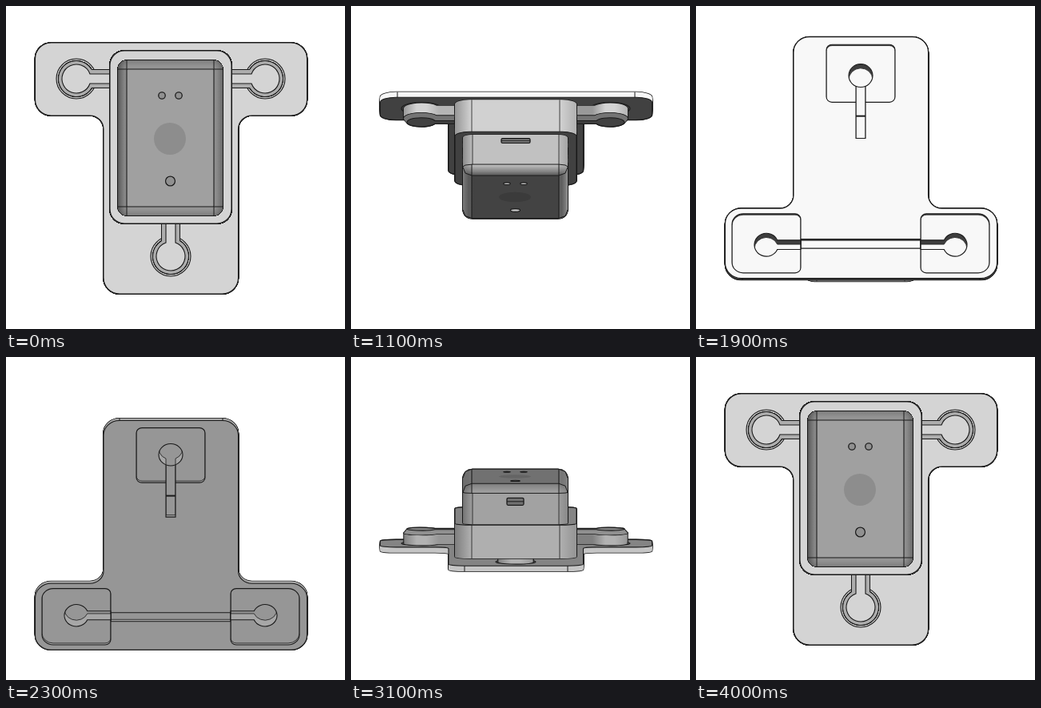
Animation, 424 px wide and 404 px high, one loop 4.1 s. Source, as an HTML page with a canvas:

```html
<!DOCTYPE html>
<html lang="en">
<head>
<meta charset="utf-8">
<title>Rotating enclosure</title>
<style>
  html, body { margin: 0; width: 100%; height: 100%; overflow: hidden; background: #fff; }
  canvas { display: block; }
</style>
</head>
<body>
<canvas id="stage" width="424" height="404"></canvas>
<script>
const ctx = document.getElementById('stage').getContext('2d');
const LOOP = 4100, CENTER_Y = 203, INK = '#1a1a1a';

// Depths along the model's z axis (towards the viewer at 0 degrees).
const BACK = -49, FRONT = -42, POCKET = -44, CAVITY = -25, RIM = 0, EDGE = 39, FACE = 50, FILLET = 11;
const CHAMFER = -29, MOUNT_TOP = -24;

// Turn angle by pose index; brightness by the tilt of a surface (negative faces up).
const TURN = [[0, 0], [7, 57], [11, 116.5], [15, 180], [30, 360]];
const PLATE = [[-90, 120], [-63, 173], [-47, 203], [-29, 240], [-15, 248], [0, 212], [26, 145], [41, 119], [61, 80], [90, 40]];
const BOX = [[-90, 105], [-47, 165], [-29, 207], [0, 160], [26, 133], [41, 113], [61, 80], [90, 45]];
const WALL = [[-90, 110], [-47, 165], [-29, 207], [0, 170], [26, 134], [43, 138], [90, 115]];

let theta, sin, cos, sideTilt;

function lerpTable(table, x) {
  let i = 1;
  while (i < table.length - 1 && x > table[i][0]) i++;
  const [x0, y0] = table[i - 1], [x1, y1] = table[i];
  const u = Math.max(0, Math.min(1, (x - x0) / (x1 - x0)));
  return y0 + (y1 - y0) * u;
}

const gray = v => { const c = Math.min(255, Math.round(v)); return `rgb(${c},${c},${c})`; };
const level = (table, tilt) => lerpTable(table, ((tilt + 540) % 360) - 180);
const shade = (table, tilt, k = 1) => gray(level(table, tilt) * k);

// Horizontal shading that falls off at the rounded left and right corners.
function cornered(x0, x1, r, value) {
  const g = ctx.createLinearGradient(x0, 0, x1, 0), edge = r / (x1 - x0);
  g.addColorStop(0, gray(value * .72));
  g.addColorStop(edge, gray(value));
  g.addColorStop(1 - edge, gray(value));
  g.addColorStop(1, gray(value * .85));
  return g;
}

function box(x, y, w, h, r) {
  const p = new Path2D();
  p.roundRect(x, y, w, h, r);
  return p;
}

function circle(x, y, r) {
  const p = new Path2D();
  p.arc(x, y, r, 0, 2 * Math.PI);
  return p;
}

function roundedPolygon(points) {
  const p = new Path2D(), n = points.length;
  p.moveTo((points[0][0] + points[n - 1][0]) / 2, (points[0][1] + points[n - 1][1]) / 2);
  points.forEach(([x, y, r], i) => {
    const next = points[(i + 1) % n];
    p.arcTo(x, y, next[0], next[1], r);
  });
  p.closePath();
  return p;
}

function keyhole({ x, y, angle, reach }, r, half) {
  const p = new Path2D(), a = Math.asin(half / r), placed = new Path2D();
  p.arc(0, 0, r, a, 2 * Math.PI - a);
  p.lineTo(reach, -half);
  p.lineTo(reach, half);
  p.closePath();
  placed.addPath(p, new DOMMatrix().translate(x, y).rotate(angle));
  return placed;
}

const range = (a, b) => Array.from({ length: b - a + 1 }, (_, i) => a + i);
const project = (y, z) => CENTER_Y + y * cos + z * sin;

function at(path, z) {
  const p = new Path2D();
  p.addPath(path, new DOMMatrix([1, 0, 0, cos, 0, CENTER_Y + z * sin]));
  return p;
}

function stroke(path, width = 1.1) {
  ctx.lineWidth = width;
  ctx.strokeStyle = INK;
  ctx.stroke(path);
}

function fill(path, style) {
  ctx.fillStyle = style;
  ctx.fill(path);
}

function polyline(points, width = 1) {
  const p = new Path2D();
  points.forEach(([x, y, z]) => p.lineTo(x, project(y, z)));
  stroke(p, width);
}

// Stacked slices: dark silhouette first, walls over it, then the near cap.
function solid(slices, wall, cap) {
  const order = cos >= 0 ? slices : [...slices].reverse();
  const shapes = order.map(([z, path]) => at(path, z));
  shapes.forEach(s => stroke(s, 1.5));
  shapes.forEach((s, i) => fill(s, wall(order[i][0])));
  const top = shapes[shapes.length - 1];
  fill(top, cap);
  stroke(top);
}

function recess(path, z, floorZ, wall, floor, floorPath = path) {
  const opening = at(path, z), bottom = at(floorPath, floorZ);
  ctx.save();
  ctx.clip(opening);
  fill(opening, wall);
  fill(bottom, floor);
  stroke(bottom, .8);
  ctx.restore();
  stroke(opening);
}

const plateShape = roundedPolygon([
  [36.5, -157, 20], [376.5, -157, 20], [376.5, -66, 20], [290.5, -66, 17],
  [290.5, 157, 20], [122, 157, 20], [122, -66, 17], [36.5, -66, 20]
]);
const plateSlices = range(BACK, FRONT).map(z => [z, plateShape]);

const mounts = [
  { x: 88, y: -112, angle: 0, reach: 43 },
  { x: 324, y: -112, angle: 180, reach: 43 },
  { x: 206, y: 110, angle: -90, reach: 42 }
];
// Each mount is a straight body below a chamfered top.
const mountParts = mounts.map(m => [
  range(FRONT, CHAMFER).map(z => [z, keyhole(m, 22, 11)]),
  range(CHAMFER, MOUNT_TOP).map(z => {
    const taper = 4 * (z - CHAMFER) / (MOUNT_TOP - CHAMFER);
    return [z, keyhole(m, 22 - taper, 11 - taper * 1.25)];
  })
]);

const collarShape = box(130, -147, 152, 216, 18);
const collarSlices = range(FRONT, RIM).map(z => [z, collarShape]);

const boxSlices = range(RIM, FACE).map(z => {
  const h = Math.max(0, z - EDGE), inset = FILLET - Math.sqrt(FILLET * FILLET - h * h);
  return [z, box(140 + inset, -135 + inset, 131 - 2 * inset, 194 - 2 * inset, Math.max(1, 12 - inset))];
});

function drawPlate() {
  const facing = cos >= 0 ? theta : theta + 180;
  solid(plateSlices, () => shade(PLATE, sideTilt), shade(PLATE, facing));
  const [xs, y] = sin > 0 ? [[58, 355], -157] : [[142, 271], 157];
  if (Math.abs(sin) > .2) xs.forEach(x => polyline([[x, y, BACK], [x, y, FRONT]]));
}

function drawBackDetails() {
  const wall = shade(PLATE, sideTilt), floor = shade(PLATE, theta + 180);
  recess(box(131, -118, 150, 12, 0), BACK, BACK + 6, wall, floor);
  [box(163, 72, 86, 75, 7), box(45, -150, 86, 77, [14, 7, 7, 14]), box(281, -150, 86, 77, [7, 14, 14, 7])]
    .forEach(p => recess(p, BACK, POCKET, wall, floor));
  recess(box(200, 25, 12, 74, 0), BACK, BACK + 6, wall, floor);
  polyline([[200, 54, BACK], [212, 54, BACK]], 2);
  const slotted = keyhole({ x: 206, y: 108, angle: -90, reach: 54 }, 15, 6);
  recess(circle(206, 108, 15), POCKET, CAVITY, wall, floor, slotted);
  mounts.slice(0, 2).forEach(m => recess(keyhole(m, 15, 6), POCKET, CAVITY, wall, floor));
}

function drawMounts() {
  const wall = level(WALL, sideTilt), face = level(PLATE, theta);
  mounts.forEach((m, i) => {
    if (cos > 0) {
      const base = at(circle(m.x, m.y, 25), FRONT);
      fill(base, gray(face * .92));
      stroke(base);
    }
    const [body, top] = mountParts[i];
    const bodyFill = cornered(m.x - 22, m.x + 22, 16, wall * 1.1);
    const chamferFill = gray(wall * .4 + face * .6);
    const steps = [
      () => solid(body, () => bodyFill, chamferFill),
      () => solid(top, () => chamferFill, gray(face))
    ];
    if (cos < 0) steps.reverse();
    steps.forEach(step => step());
  });
}

function drawCollar() {
  const wall = cornered(130, 282, 20, level(WALL, sideTilt) * 1.08);
  solid(collarSlices, () => wall, shade(PLATE, theta));
  const y = sin > 0 ? -147 : 69;
  if (Math.abs(sin) > .1) [151, 261].forEach(x => polyline([[x, y, FRONT], [x, y, RIM]], .8));
}

// A slot on the top or bottom wall of the box.
function drawSlot(x, y, z, w, h) {
  const p = new Path2D(), slot = box(x, z - h / 2, w, h, 1.5);
  p.addPath(slot, new DOMMatrix([1, 0, 0, sin, 0, CENTER_Y + y * cos]));
  fill(p, shade(WALL, sideTilt, .7));
  stroke(p, 1.3);
  polyline([[x, y, z], [x + w, y, z]]);
}

function drawBox() {
  const wall = z => {
    const bend = Math.asin(Math.max(0, (z - EDGE) / FILLET)) / (Math.PI / 2);
    return cornered(140, 271, 13, level(WALL, sideTilt) * (1 - bend) + level(BOX, theta) * bend);
  };
  solid(boxSlices, wall, shade(BOX, theta));

  const end = sin > 0 ? -135 : 59, inward = sin > 0 ? 1 : -1;
  if (Math.abs(sin) > .1) {
    polyline([[140, end + 9 * inward, EDGE], [143, end + 3 * inward, EDGE], [152, end, EDGE],
      [260, end, EDGE], [268, end + 3 * inward, EDGE], [271, end + 9 * inward, EDGE]]);
    [152, 260].forEach(x => polyline([[x, end, RIM], [x, end, EDGE]], .8));
    if (sin > 0) drawSlot(188, -135, 8, 36, 6);
    else drawSlot(195, 59, 28.5, 21, 9);
  }
  if (cos > 0) drawFace();
}

function drawFace() {
  // Fillet seams running from the flat face to the outline.
  for (const y of [-124, 48]) {
    polyline([[140, y, EDGE], [143, y, 47], [151, y, FACE]]);
    polyline([[271, y, EDGE], [268, y, 47], [260, y, FACE]]);
    const out = y < 0 ? -1 : 1;
    if (out * sin < .1)
      [151, 260].forEach(x => polyline([[x, y, FACE], [x, y + out * 8, 47], [x, y + out * 11, EDGE]]));
  }
  const wall = shade(WALL, sideTilt), floor = shade(BOX, theta, .9);
  [195, 216].forEach(x => recess(circle(x, -91, 4.3), FACE, FACE - 4, wall, floor));
  recess(circle(205.5, 16, 6), FACE, FACE - 4, wall, floor);
  fill(at(circle(205, -37, 20), FACE), shade(BOX, theta, .88));
}

function draw(pose) {
  theta = lerpTable(TURN, pose);
  const rad = theta * Math.PI / 180;
  sin = Math.sin(rad);
  cos = Math.cos(rad);
  sideTilt = theta + (sin > 0 ? -90 : 90);
  ctx.clearRect(0, 0, 424, 404);
  const parts = [drawPlate, drawMounts, drawCollar, drawBox];
  if (cos < 0) parts.reverse().push(drawBackDetails);
  parts.forEach(part => part());
}

// The pose advances every 100 ms, but holds on every fourth tick.
let shown = -1;
function tick() {
  const step = Math.floor(performance.now() % LOOP / 100);
  const pose = step - Math.floor((step + 2) / 4);
  if (pose !== shown) draw(shown = pose);
  requestAnimationFrame(tick);
}
tick();
</script>
</body>
</html>
```
